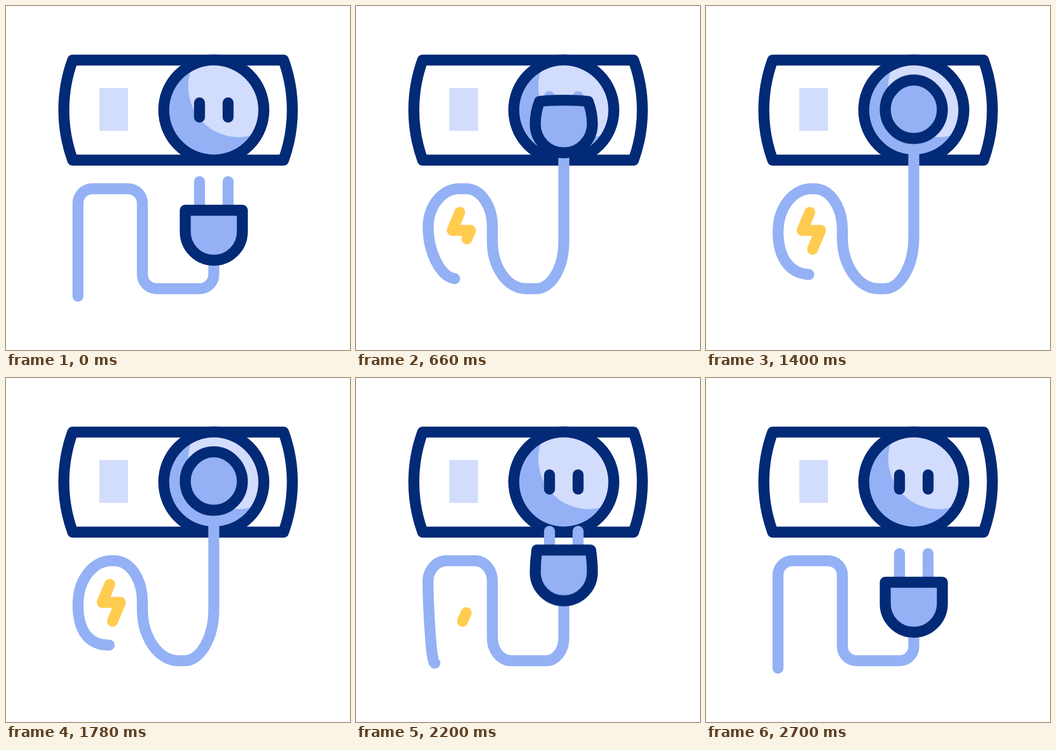
These frames come from a looping animation (640x640 px, 3600 ms). An HTML page without scripts:

```html
<!DOCTYPE html>
<html lang="en">
<head>
<meta charset="utf-8">
<title>Plug and socket</title>
<style>
  :root {
    --navy: #032a76;
    --blue: #93b1f4;
    --pale: #d2dcfd;
    --yellow: #ffcc50;
    --push: cubic-bezier(.72, 0, .28, 1);
    --pull: cubic-bezier(.48, 0, .1, 1);
    --slack: cubic-bezier(.5, 0, 0, 1);
    --draw: cubic-bezier(.5, 0, .5, 1);
  }
  html, body { margin: 0; width: 100%; height: 100%; overflow: hidden; background: #fff; }
  svg { display: block; width: 100%; height: 100%; }

  .line { fill: none; stroke-width: 20.4; stroke-linecap: round; stroke-linejoin: round; }
  .navy { stroke: var(--navy); }
  .blue { stroke: var(--blue); }
  .filled { fill: var(--blue); }

  .plug, .shell, .pins, .cord, .bolt { animation: 3.6s linear infinite; }
  .plug { animation-name: plug; }
  .shell { animation-name: shell; }
  .pins { animation-name: pins; }
  .cord { animation-name: cord; }
  .bolt { stroke: var(--yellow); stroke-dasharray: 100 300; animation-name: bolt, show; }

  @keyframes plug {
    0%, 7.6% { transform: none; animation-timing-function: var(--push); }
    25.56% { transform: translateY(-226px); }
    50% { transform: translateY(-227px); animation-timing-function: var(--pull); }
    75%, 100% { transform: none; }
  }

  /* flat plug, tilted plug, plug seen from behind */
  @keyframes shell {
    0%, 12.78%, 64.7%, 100% {
      d: path("M333.5 380C351 380 422 380 439.7 380C439.7 393 439.7 407 439.7 420C439.7 449 416 473 386.6 473C357 473 333.5 449 333.5 420C333.5 407 333.5 393 333.5 380Z");
    }
    17.7%, 57.22% {
      d: path("M340 377C360 377 413 377 433.2 377C437 390 439.7 406 439.7 420C439.7 449 416 473 386.6 473C357 473 333.5 449 333.5 420C333.5 406 336 390 340 377Z");
    }
    22.2%, 52.2% {
      d: path("M349 381C370 358.7 403 358.7 424.2 381C434 391 439.7 405 439.7 419C439.7 449 416 473 386.6 473C357 473 333.5 449 333.5 419C333.5 405 339 391 349 381Z");
    }
  }

  @keyframes pins {
    0%, 12.78%, 64.7%, 100% { d: path("M360 326.7L360 390M413.2 326.7L413.2 390"); }
    17.7%, 57.22% { d: path("M360 362.3L360 390M413.2 362.3L413.2 390"); }
    22.2%, 52.2% { d: path("M360 405L360 405M413.2 405L413.2 405"); }
  }

  @keyframes cord {
    0%, 7.6% {
      d: path("M133.9 540C133.9 540 133.9 367 133.9 367C133.9 352 146 340 160.5 340L227 340C242 340 253.7 352 253.7 367L253.7 499C253.7 514 265.5 526 280.3 526L360 526C374.7 526 386.6 514 386.6 499L386.6 425");
      animation-timing-function: var(--push);
    }
    25.56% {
      d: path("M190 503C158 498 134.3 466 134.3 418C134.3 375 162 340 196 340L202 340C231 340 253.7 374 253.7 417L253.7 430C253.7 483 284 526 321 526L332 526C362 526 386.6 483 386.6 430L386.6 199");
      animation-timing-function: ease-in-out;
    }
    50% {
      d: path("M192 497C152 497 134 468 134 422C134 375 162 340 196 340L202 340C231 340 253.7 374 253.7 417L253.7 430C253.7 483 284 526 321 526L332 526C362 526 386.6 483 386.6 430L386.6 198");
      animation-timing-function: var(--slack);
    }
    73.33%, 100% {
      d: path("M133.9 540C133.9 540 133.9 367 133.9 367C133.9 352 146 340 160.5 340L227 340C242 340 253.7 352 253.7 367L253.7 499C253.7 514 265.5 526 280.3 526L360 526C374.7 526 386.6 514 386.6 499L386.6 425");
    }
  }

  @keyframes bolt {
    0%, 11.67% { stroke-dashoffset: 99.9; animation-timing-function: var(--draw); }
    25% { stroke-dashoffset: 0; }
    53.89% { stroke-dashoffset: 0; animation-timing-function: var(--draw); }
    67.22%, 100% { stroke-dashoffset: -99.9; }
  }

  @keyframes show {
    0% { visibility: hidden; animation-timing-function: step-end; }
    11.67% { visibility: visible; animation-timing-function: step-end; }
    67.22%, 100% { visibility: hidden; animation-timing-function: step-end; }
  }
</style>
</head>
<body>
<svg viewBox="0 0 640 640">
  <clipPath id="face"><circle cx="386.6" cy="193.5" r="90"/></clipPath>

  <path class="line navy" d="M124 100.6H516.3A272 272 0 0 1 516.3 286.7H124A272 272 0 0 1 124 100.6Z"/>
  <rect x="173.6" y="152.5" width="53.4" height="79.8" fill="var(--pale)"/>

  <circle cx="386.6" cy="193.5" r="93" fill="var(--blue)"/>
  <circle cx="433" cy="150" r="94" fill="var(--pale)" clip-path="url(#face)"/>
  <circle class="line navy" cx="386.6" cy="193.5" r="93.1"/>
  <path class="line navy" d="M360 180.3V206.8M413.2 180.3V206.8"/>

  <path class="line blue cord" d="M133.9 540V367"/>
  <path class="line bolt" pathLength="100" d="M193 384L179 417.5H213L198.2 452.5"/>

  <g class="plug">
    <path class="line blue pins" d="M360 326.7V390M413.2 326.7V390"/>
    <path class="line navy filled shell" d="M333.5 380H439.7V420A53 53 0 0 1 333.5 420Z"/>
  </g>
</svg>
</body>
</html>
```
